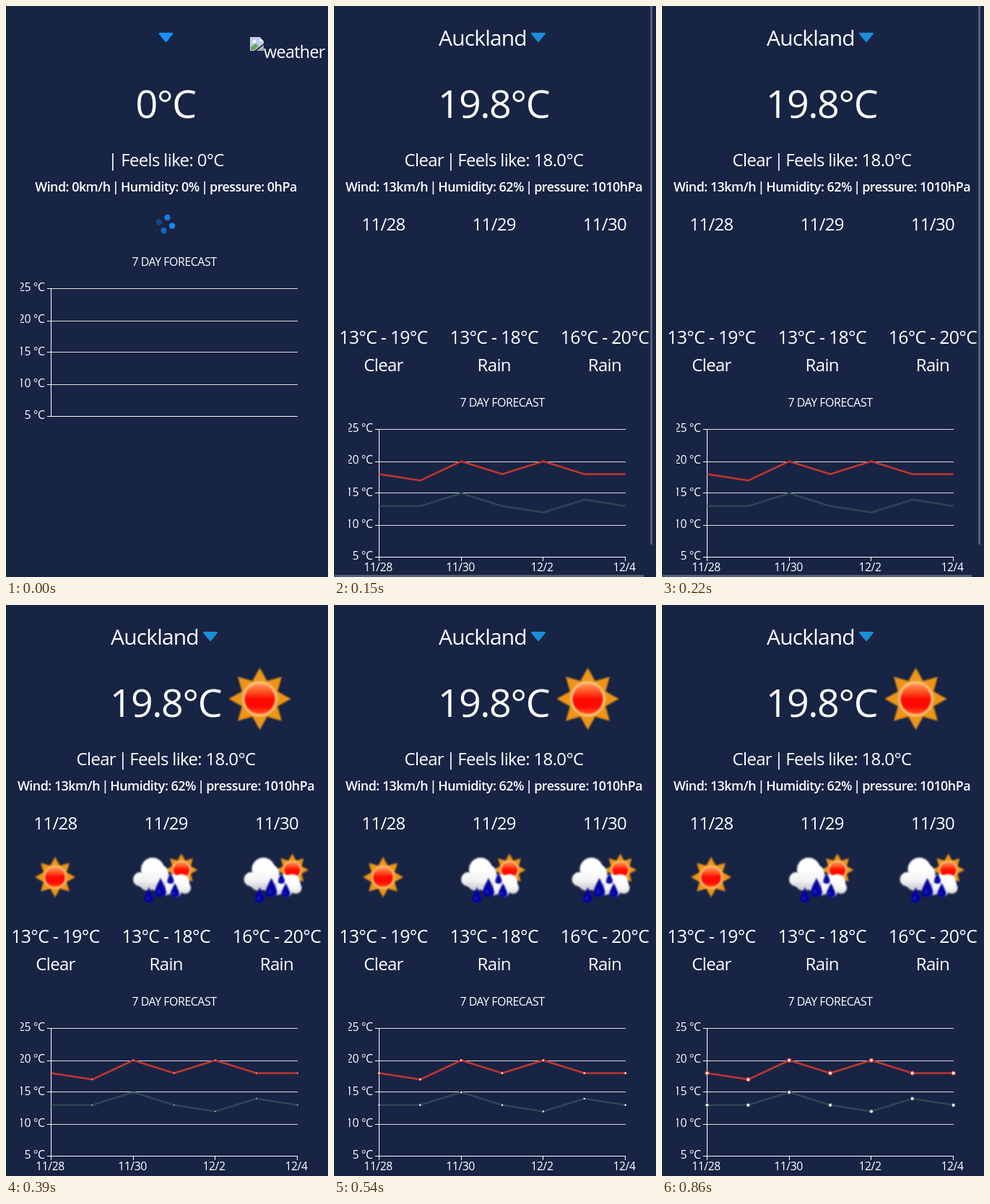
Recreate the animation shown at these times as an HTML page with a canvas. Size 446x791 px, loop 0.94 s.

```html
<!DOCTYPE html>
<html lang="en">
<head>
<meta charset="utf-8">
<title>Weather</title>
<style>
  html, body { margin: 0; width: 100%; height: 100%; overflow: hidden; background: #182444; }
  canvas { display: block; }
</style>
</head>
<body>
<canvas id="stage" width="446" height="791"></canvas>
<script>
const ctx = document.getElementById('stage').getContext('2d');
const LOOP = 940;
const STEPS = [0, 70, 150, 220, 310, 390, 470, 540, 620, 700, 780, 860];
const LOADED = 150, ICONS = 310;
const HIGHS = [18, 17, 20, 18, 20, 18, 18];
const LOWS = [13, 13, 15, 13, 12, 14, 13];
const DAYS = [
  ['11/28', '13°C - 19°C', 'Clear'],
  ['11/29', '13°C - 18°C', 'Rain'],
  ['11/30', '16°C - 20°C', 'Rain'],
];

function text(str, x, y, size, align = 'center', weight = 450) {
  ctx.font = `${weight} ${size}px "Open Sans", "Noto Sans", sans-serif`;
  ctx.letterSpacing = -size * 0.028 + 'px';
  ctx.textAlign = align;
  ctx.fillStyle = '#fff';
  ctx.fillText(str.replaceAll(' | ', '\u2006|\u2006'), x, y);
}

function rect(x, y, w, h, color) {
  ctx.fillStyle = color;
  ctx.fillRect(x, y, w, h);
}

function disc(x, y, r, color) {
  ctx.fillStyle = color;
  ctx.beginPath();
  ctx.arc(x, y, r, 0, Math.PI * 2);
  ctx.fill();
}

function poly(points, color) {
  ctx.fillStyle = color;
  ctx.beginPath();
  points.forEach(p => ctx.lineTo(...p));
  ctx.closePath();
  ctx.fill();
}

function arrow(x, color) {
  poly([[x - 9, 38], [x + 9, 38], [x, 49]], color);
  ctx.strokeStyle = color;
  ctx.lineWidth = 2;
  ctx.lineJoin = 'round';
  ctx.stroke();
}

function spinner(t) {
  for (let i = 0; i < 4; i++) {
    const angle = (-74.5 + 0.3 * t - 90 * (i + 1)) * Math.PI / 180;
    const phase = (0.06 + t / 1000 + 0.4 * i) % 2;
    ctx.globalAlpha = 0.3 + 0.7 * (1 - Math.abs(1 - phase));
    disc(221 + 9.4 * Math.cos(angle), 302 + 9.4 * Math.sin(angle), 4.2, '#1890ff');
  }
  ctx.globalAlpha = 1;
}

function brokenImage() {
  poly([[338, 43], [351, 43], [357, 49], [357, 52], [344, 62], [338, 62]], '#c9ced6');
  poly([[339, 44], [350, 44], [350, 50], [356, 50], [344, 61], [339, 61]], '#b9cdee');
  poly([[339, 57], [345, 52], [350, 55], [344, 61], [339, 61]], '#69a463');
  disc(344, 49, 2.4, '#f2f5fa');
  poly([[351, 43], [357, 49], [351, 49]], '#f3f3f3');
  poly([[357, 54], [357, 62], [347, 62]], '#a9afb8');
}

function fade(x0, y0, x1, y1, ...colors) {
  const gradient = ctx.createLinearGradient(x0, y0, x1, y1);
  colors.forEach((c, i) => gradient.addColorStop(i / (colors.length - 1), c));
  return gradient;
}

function sun(x, y, r) {
  const star = Array.from({ length: 16 }, (_, i) => {
    const a = i * Math.PI / 8, d = i % 2 ? r * 0.62 : r;
    return [x + d * Math.sin(a), y - d * Math.cos(a)];
  });
  poly(star, '#ee9518');
  disc(x, y, r * 0.57, '#ffc27c');
  const red = fade(x, y - r * 0.5, x, y + r * 0.5, '#ff9a58', '#ff5a28', '#ff0a00', '#ff0800', '#ff5a1c');
  disc(x, y, r * 0.49, red);
}

function drop(x, top, h) {
  const bottom = top + h;
  ctx.fillStyle = '#0404a4';
  ctx.beginPath();
  ctx.moveTo(x, top);
  ctx.bezierCurveTo(x + h * 0.15, top + h * 0.35, x + h * 0.6, bottom, x, bottom);
  ctx.bezierCurveTo(x - h * 0.6, bottom, x - h * 0.15, top + h * 0.35, x, top);
  ctx.fill();
  disc(x - h * 0.08, bottom - h * 0.27, h * 0.07, '#2c38b8');
}

function cloud(puffs, top, bottom) {
  const shade = fade(0, top, 0, bottom, '#fff', '#fff', '#f2f2f3', '#bcbcc2');
  puffs.forEach(([x, y, r]) => disc(x, y, r, shade));
}

function rain(x) {
  ctx.save();
  ctx.translate(x, 0);
  sun(22, 367, 22.5);
  cloud([[1, 392, 10], [9, 386, 13], [22, 384, 11], [27, 392, 8], [14, 395, 9]], 371, 405);
  cloud([[-35, 380, 10], [-18, 366, 16], [-8, 372, 12], [-24, 383, 13], [-10, 386, 11]], 350, 398);
  drop(-23, 391, 21);
  drop(-7, 378, 26);
  drop(7, 371, 15);
  drop(13, 385, 20);
  ctx.restore();
}

function icons() {
  ctx.filter = 'blur(1.2px)';
  sun(351.5, 130, 43);
  ctx.filter = 'blur(0.8px)';
  sun(68, 377, 28);
  rain(221);
  rain(374.5);
  ctx.filter = 'none';
}

function series(values, base, color, scale) {
  const points = values.map((v, i) => [62.5 + i * 56.85, base + 0.5 - (v - 5) * 8.85]);
  ctx.strokeStyle = color;
  ctx.lineWidth = 2.5;
  ctx.lineJoin = 'bevel';
  ctx.beginPath();
  points.forEach(p => ctx.lineTo(...p));
  ctx.stroke();
  for (const [x, y] of points) {
    disc(x, y, 3.3 * scale, color);
    disc(x, y, 2 * scale, '#fff');
  }
}

function chart(base, t) {
  text('7 DAY FORECAST', 233, base - 208, 15.9);
  ctx.save();
  ctx.beginPath();
  ctx.rect(20, 0, 426, 791);
  ctx.clip();
  for (let i = 0; i < 5; i++) {
    // Ticks snap to whole layout pixels, shown at 125% zoom.
    const y = Math.round(base - 1.25 * Math.round(35.4 * i));
    rect(62, y, 342, 1, i ? '#dcdcdc' : '#fff');
    rect(57, y, 5, 1, '#fff');
    text(`${5 + 5 * i} °C`, 53.5, base - 44.2 * i + 4, 15.8, 'right');
  }
  ctx.restore();
  rect(62, base - 177, 1, 178, '#fff');
  if (t < LOADED) return;

  ['11/28', '11/30', '12/2', '12/4'].forEach((day, i) => {
    const x = Math.round(62 + i * 113.7);
    rect(x, base, 1, 6, '#fff');
    text(day, x - 1, base + 20, 15.8);
  });
  const scale = Math.max(0, (t - 200) / 660) ** 0.8;
  series(HIGHS, base, '#c23531', scale);
  series(LOWS, base, '#2f4554', scale);
}

function scrollbars(t) {
  const alpha = t < ICONS ? 0.27 : t === ICONS ? 0.1 : 0;
  const color = `rgba(255, 255, 255, ${alpha})`;
  rect(438, 0, 3, 746, color);
  rect(1, 788, 428, 3, color);
}

function summary(temp, feels, details) {
  text(temp, 221, 155, 53.8);
  text(feels, 221.5, 222, 24);
  text(details, 221.5, 257, 17.9, 'center', 600);
}

function draw(t) {
  rect(0, 0, 446, 791, '#182444');
  if (t < LOADED) {
    arrow(221.5, '#1890ff');
    brokenImage();
    text('weather', 357, 72, 23.3, 'left');
    summary('0°C', '| Feels like: 0°C', 'Wind: 0km/h | Humidity: 0% | pressure: 0hPa');
    spinner(t);
    chart(568, t);
    return;
  }
  text('Auckland', 206, 55, 30);
  arrow(283, '#1b8fdc');
  summary('19.8°C', 'Clear | Feels like: 18.0°C',
    'Wind: 13km/h | Humidity: 62% | pressure: 1010hPa');
  DAYS.forEach(([date, range, sky], i) => {
    const x = 68.5 + 153.2 * i;
    text(date, x, 311, 24);
    text(range, x, 468, 24.8);
    text(sky, x, 506, 24);
  });
  if (t >= ICONS) icons();
  chart(763, t);
  scrollbars(t);
}

function tick() {
  const now = performance.now() % LOOP;
  draw(STEPS.findLast(s => s <= now));
  requestAnimationFrame(tick);
}
tick();
</script>
</body>
</html>
```
